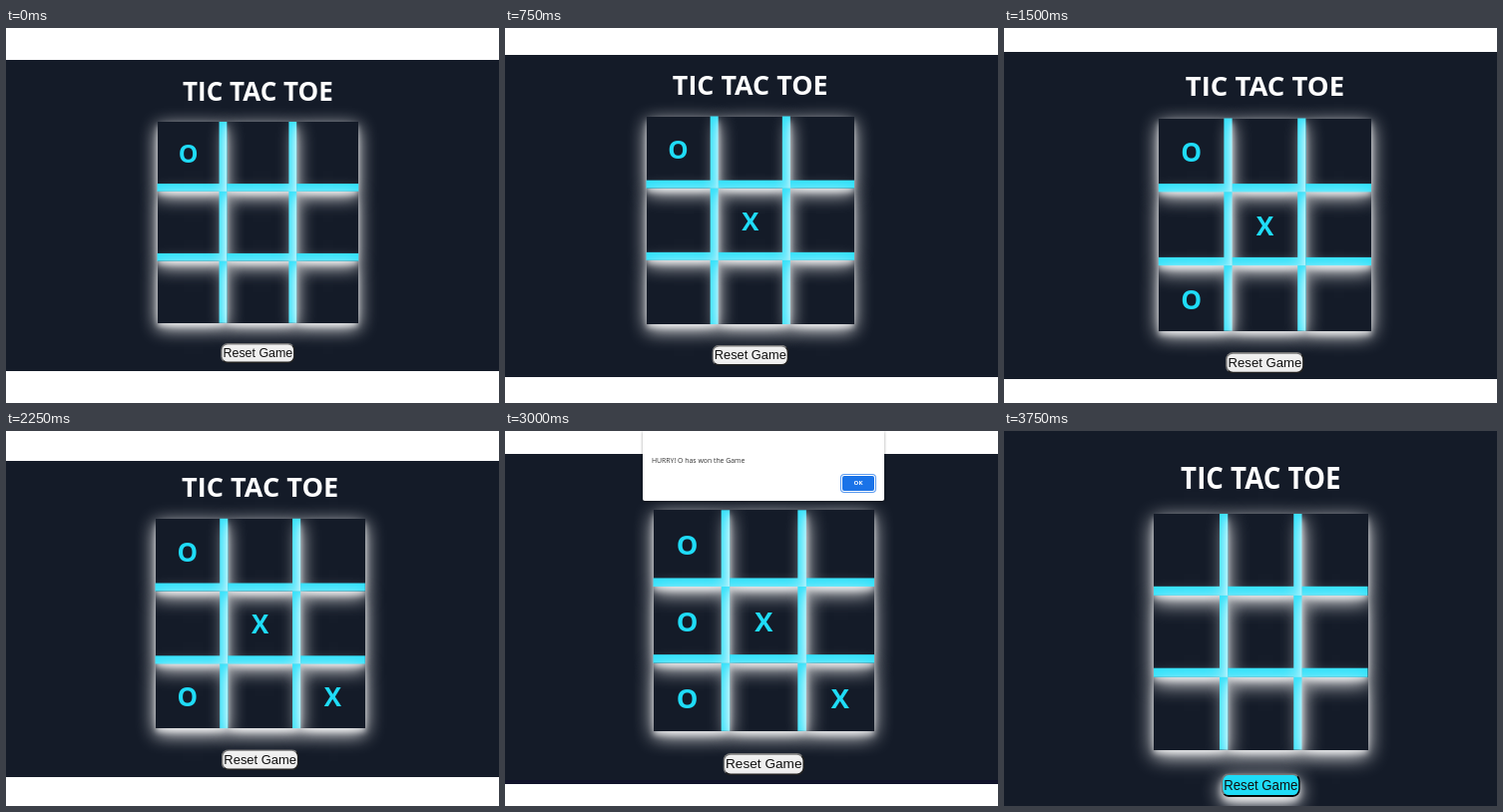
Animation, 494 px wide and 376 px high, one loop 4500 ms. Source, as an HTML page:

```html
<!DOCTYPE html>
<html lang="en">
<head>
<meta charset="utf-8">
<title>Tic Tac Toe</title>
<style>
  html, body { margin: 0; width: 100%; height: 100%; overflow: hidden; background: #fff; }
  #page { position: absolute; left: 0; width: 494px; overflow: hidden; background: #141b28; }
  #game { position: absolute; width: 260px; height: 260px; transform-origin: 0 0; }
  h1, .cell { font-family: "Open Sans", "Noto Sans", sans-serif; font-weight: 700; }
  h1 {
    position: absolute; left: -50px; top: -65px; width: 360px; margin: 0;
    font-size: 33.5px; line-height: 50px; text-align: center; color: #fff;
  }
  #board { display: grid; grid-template-columns: 90px 90px 80px; grid-template-rows: 90px 90px 80px; }
  .cell {
    box-sizing: border-box; border: 0 solid #2be0fa;
    font-size: 32px; line-height: 82px; text-align: center; color: #1fdcf7;
    box-shadow: 0 7px 22px #fff, 0 5px 7px rgba(255, 255, 255, .6);
  }
  .cell:not(:nth-child(3n)) { border-right-width: 10px; }
  .cell:nth-child(-n + 6) { border-bottom-width: 10px; }
  button {
    position: absolute; left: 82px; top: 286px; width: 96px; height: 26px; padding: 0;
    box-sizing: border-box; border: 2px outset #777; border-radius: 9px;
    background: #efefef; color: #111; font: 16px/22px "Liberation Sans", Arial, sans-serif;
    white-space: nowrap;
  }
  button.hover { background: #1fdcf7; border-color: #222; box-shadow: 0 7px 22px #fff, 0 5px 7px rgba(255, 255, 255, .6); }
  #alert {
    position: absolute; left: 138px; top: 0; width: 242px; height: 70px;
    background: #fff; border-radius: 0 0 2px 2px; box-shadow: 0 1px 3px rgba(0, 0, 0, .4);
    font: 6.9px/10px "Open Sans", sans-serif; color: #333;
  }
  #alert span { position: absolute; left: 9px; top: 25px; white-space: nowrap; }
  #alert b {
    position: absolute; left: 200px; top: 45px; width: 32px; height: 15px; border-radius: 2px;
    background: #1a73e8; box-shadow: 0 0 0 1px #fff, 0 0 0 2px #5b9bf0;
    color: #fff; font-size: 6px; line-height: 15px; text-align: center;
  }
</style>
</head>
<body>
<div id="page">
  <div id="game">
    <h1>TIC TAC TOE</h1>
    <div id="board"></div>
    <button>Reset Game</button>
  </div>
</div>
<div id="alert"><span>HURRY! O has won the Game</span><b>OK</b></div>
<script>
  const STEP = 750;
  const scenes = [
    { x: 151.5, y: 94, sx: .776, top: 32, bottom: 344, marks: "O        " },
    { x: 141.5, y: 88.5, sx: .802, top: 27, bottom: 350, marks: "O   X    " },
    { x: 154.8, y: 90.5, sx: .82, top: 24, bottom: 352, marks: "O   X O  " },
    { x: 149.5, y: 87.8, sx: .809, top: 30, bottom: 347, marks: "O   X O X" },
    { x: 148.5, y: 79.3, sx: .852, top: 23, bottom: 354, marks: "O  OX O X", won: true },
    { x: 150, y: 83, sx: .825, sy: .91, top: 0, bottom: 376, marks: "         ", hover: true },
  ];

  const $ = selector => document.querySelector(selector);
  const page = $("#page"), game = $("#game"), alertBox = $("#alert"), reset = $("button");
  const cells = Array.from({ length: 9 }, () => {
    const cell = document.createElement("div");
    cell.className = "cell";
    $("#board").append(cell);
    return cell;
  });

  function show({ x, y, sx, sy = sx, top, bottom, marks, won = false, hover = false }) {
    page.style.top = `${top}px`;
    page.style.height = `${bottom - top}px`;
    page.style.boxShadow = won ? "inset 0 -4px #10122a" : "none";
    game.style.transform = `translate(${x}px, ${y - top}px) scale(${sx}, ${sy})`;
    cells.forEach((cell, i) => cell.textContent = marks[i].trim());
    alertBox.hidden = !won;
    reset.classList.toggle("hover", hover);
  }

  let current = -1;
  function tick() {
    const index = Math.floor(performance.now() / STEP) % scenes.length;
    if (index !== current) show(scenes[current = index]);
    requestAnimationFrame(tick);
  }
  tick();
</script>
</body>
</html>
```
